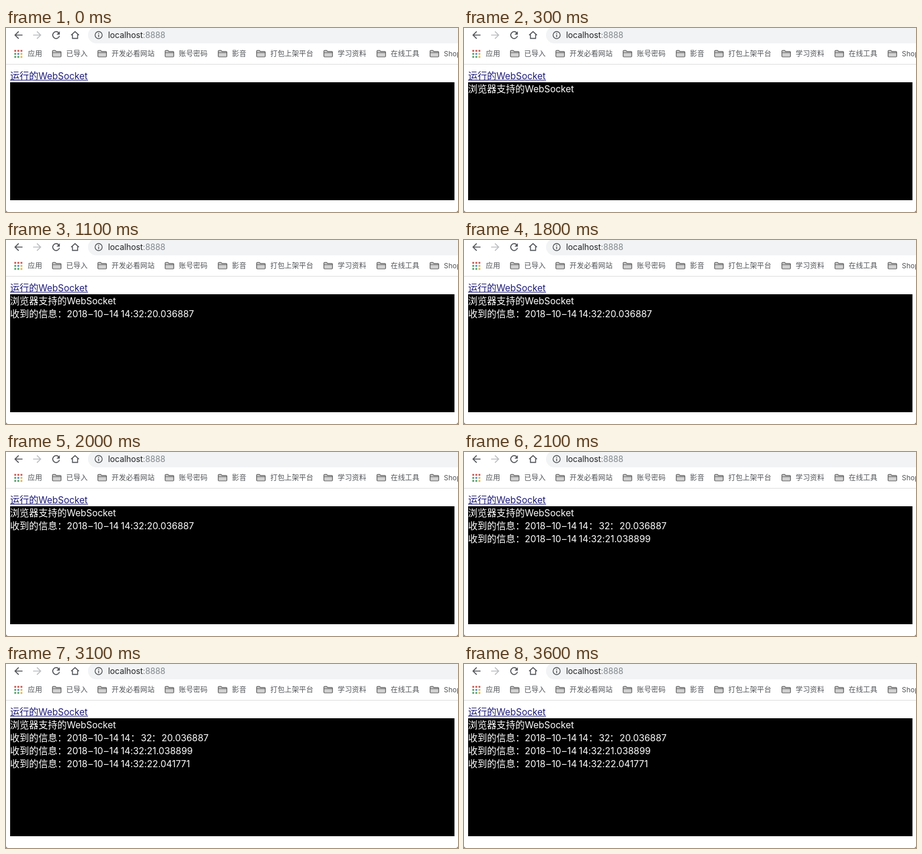
An HTML page that plays this animation: 766x312 px, repeating every 3.7 s.

```html
<!DOCTYPE html>
<html lang="zh-CN">
<head>
<meta charset="utf-8">
<title>WebSocket</title>
<style>
  html, body { margin: 0; width: 100%; height: 100%; overflow: hidden; background: #fff; }
  svg { display: block; width: 766px; height: 312px; }
  text { font: 16px "Noto Sans CJK SC", "Noto Sans CJK", sans-serif; }
  .latin { font-family: Inter, "Open Sans", sans-serif; font-size: 15.5px; font-feature-settings: "calt" 0; }
  .url { font-size: 13.8px; fill: #202124; }
  .url tspan { fill: #80868b; }
  .marks text { font-size: 12px; letter-spacing: .15px; fill: #505357; }
  .marks .latin { font-size: 11.8px; }
  .link { fill: #1c1a78; }
  .log { fill: #fff; }
  .icon { fill: none; stroke: #505357; stroke-width: 1.7; }

  .log g { animation: 3700ms step-end infinite; }
  .log .open { animation-name: open; }
  .log .first { animation-name: first; }
  .log .narrow { animation-name: narrow; }
  .log .second { animation-name: second; }
  .log .third { animation-name: third; }
  @keyframes open { 0% { opacity: 0 } 5.4%, 100% { opacity: 1 } }
  @keyframes first { 0% { opacity: 0 } 29.72%, 100% { opacity: 1 } }
  @keyframes narrow { 0% { opacity: 1 } 56.75%, 100% { opacity: 0 } }
  @keyframes second { 0% { opacity: 0 } 56.75%, 100% { opacity: 1 } }
  @keyframes third { 0% { opacity: 0 } 83.78%, 100% { opacity: 1 } }
</style>
</head>
<body>
<svg viewBox="0 0 766 312">
  <defs>
    <g id="folder">
      <path d="M.7 10.3V1.9q0-1.2 1.2-1.2h3.6l1.6 1.7h7q1.2 0 1.2 1.2v6.7q0 1.2-1.2 1.2H1.9Q.7 11.5.7 10.3z" fill="#d2d2d2" stroke="#5a5a5a" stroke-width="1.2"/>
      <path d="M1 4.4h14" stroke="#5a5a5a"/>
    </g>
    <g id="received">
      <text x="7">收到的信息：</text>
      <text class="latin" x="103" dx="0 0 0 0 1.3 1.3 0 1.3 1.3">2018–10–14</text>
    </g>
  </defs>

  <!-- toolbar -->
  <rect x="139" y="-2" width="660" height="28" rx="14" fill="#f1f3f4"/>
  <g class="icon">
    <path d="M28 12H15.5M21.5 5.8 15.3 12l6.2 6.2"/>
    <path d="M46 12h12.5M52.5 5.8 58.7 12l-6.2 6.2" stroke="#bcbec0"/>
    <path d="M89.4 8.2A5.8 5.8 0 1 0 90.6 13.4"/>
    <path d="M91.2 5.6v5.6h-5.6z" fill="#505357" stroke="none"/>
    <path d="M110.4 12.2 117 6.2l6.6 6M112.6 11v6.6h8.8V11" stroke-width="1.6"/>
    <circle cx="157" cy="12" r="6" stroke-width="1.4"/>
    <path d="M157 11.2v4.2M157 8.4v1.5" stroke-width="1.5"/>
  </g>
  <text class="latin url" x="173" y="17">localhost<tspan>:8888</tspan></text>

  <!-- bookmarks -->
  <g class="marks">
    <g stroke-width="3" stroke-dasharray="3 2.2">
      <path d="M14.2 38.7h13.4" stroke="#c9544a"/>
      <path d="M14.2 43.9h3" stroke="#4f9a64"/>
      <path d="M19.4 43.9h3" stroke="#5580c4"/>
      <path d="M24.6 43.9h3" stroke="#dfb04a"/>
      <path d="M14.2 49.1h8.2" stroke="#4f9a64"/>
      <path d="M24.6 49.1h3" stroke="#dfb04a"/>
    </g>
    <use href="#folder" x="78" y="37.5"/>
    <use href="#folder" x="155" y="37.5"/>
    <use href="#folder" x="269" y="37.5"/>
    <use href="#folder" x="359" y="37.5"/>
    <use href="#folder" x="424" y="37.5"/>
    <use href="#folder" x="538" y="37.5"/>
    <use href="#folder" x="628" y="37.5"/>
    <use href="#folder" x="718" y="37.5"/>
    <text x="37" y="48">应用</text>
    <text x="102" y="48">已导入</text>
    <text x="179" y="48">开发必看网站</text>
    <text x="293" y="48">账号密码</text>
    <text x="383" y="48">影音</text>
    <text x="448" y="48">打包上架平台</text>
    <text x="562" y="48">学习资料</text>
    <text x="652" y="48">在线工具</text>
    <text class="latin" x="742" y="48">Shop</text>
  </g>
  <path d="M0 61.5h766" stroke="#dcdcdc"/>

  <!-- page -->
  <g class="link">
    <text x="7" y="87">运行的</text>
    <text class="latin" x="55" y="87">WebSocket</text>
    <rect x="7" y="88" width="132" height="1"/>
  </g>
  <rect x="7" y="92" width="753" height="200"/>

  <g class="log">
    <g class="open">
      <text x="7" y="109">浏览器支持的</text>
      <text class="latin" x="103" y="109">WebSocket</text>
    </g>
    <g class="first">
      <use href="#received" y="131"/>
      <g class="narrow">
        <text class="latin" x="194.5" y="131">14:32:20.036887</text>
      </g>
    </g>
    <g class="second">
      <text class="latin" x="194.5" y="131">14</text>
      <text x="211" y="131">：</text>
      <text class="latin" x="228.5" y="131">32</text>
      <text x="246.5" y="131">：</text>
      <text class="latin" x="263.5" y="131">20.036887</text>
      <use href="#received" y="153"/>
      <text class="latin" x="194.5" y="153">14:32:21.038899</text>
    </g>
    <g class="third">
      <use href="#received" y="175"/>
      <text class="latin" x="194.5" y="175">14:32:22.041771</text>
    </g>
  </g>

  <!-- window corners -->
  <path d="M0 308q0 4 4 4H0zM766 308q0 4-4 4h4z" fill="#6e6e6e"/>
</svg>
</body>
</html>
```
